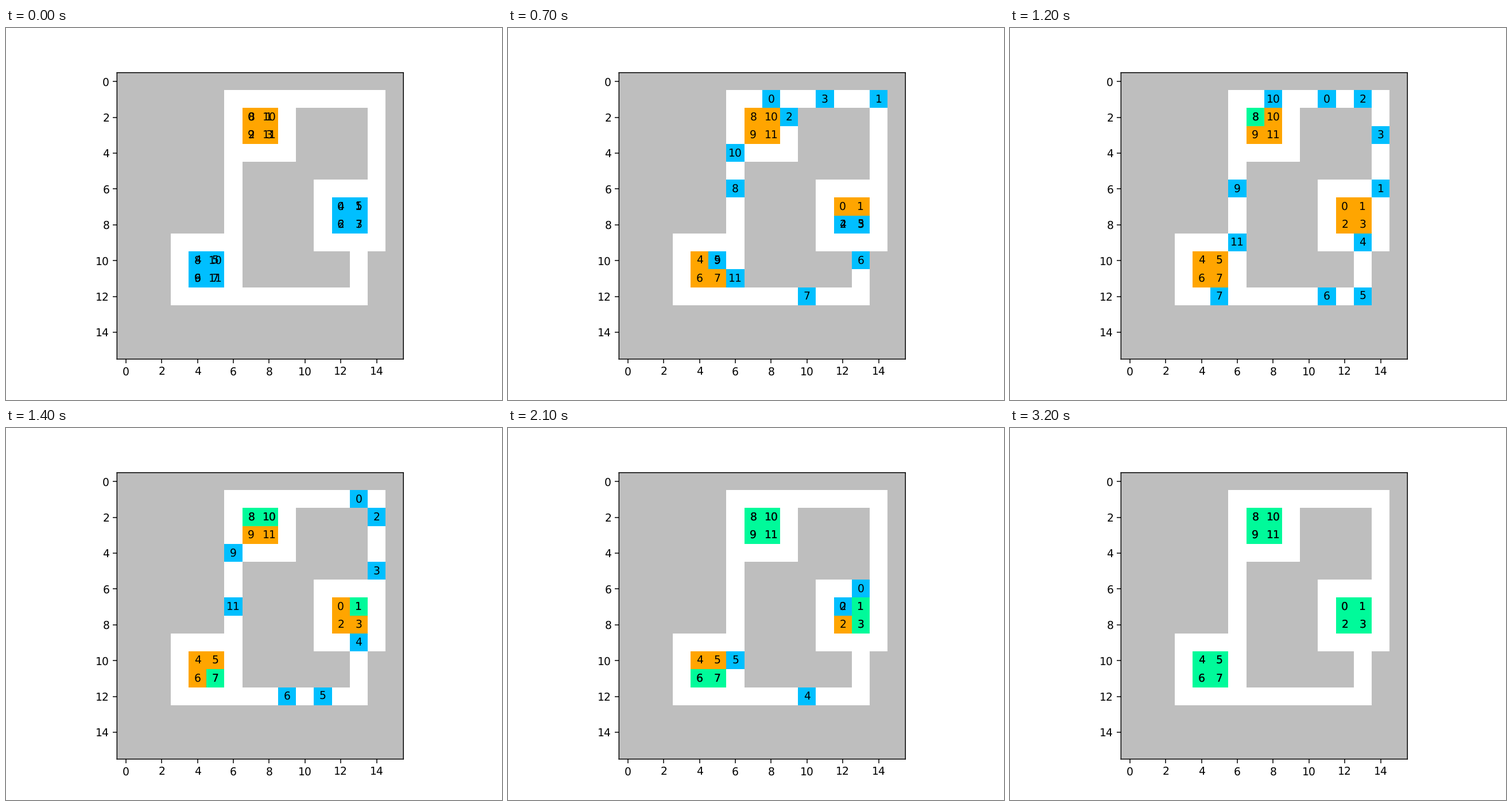
Animation of 864x648 px, one loop 8 s. Source, as a matplotlib script:

```python
import numpy as np
import matplotlib.pyplot as plt
from matplotlib.animation import FuncAnimation
from matplotlib.colors import to_rgb

plt.rcParams["text.hinting"] = "none"

FRAMES, STEP_MS = 80, 100
SIZE = 16
WALL, FREE, GOAL, AGENT, DONE = (
    to_rgb(c) for c in ("#bebebe", "white", "orange", "deepskyblue", "mediumspringgreen")
)

# Open areas as inclusive (left, top, right, bottom) cells.
AREAS = [
    (6, 1, 9, 4), (11, 6, 14, 9), (3, 9, 6, 12),
    (6, 1, 14, 1), (14, 1, 14, 9), (13, 9, 13, 12),
    (3, 12, 13, 12), (6, 1, 6, 12),
]
MOVES = {"U": (0, -1), "D": (0, 1), "L": (-1, 0), "R": (1, 0), "W": (0, 0)}

# Start cell and route of each agent: direction (W waits) and number of steps.
AGENTS = [
    ((7, 2), "W1 U1 R1 W6 R6 D5 L2 D1"),
    ((8, 2), "U1 R6 D6 L1"),
    ((7, 3), "W1 R1 U1 W3 R1 U1 R5 D5 L2 D2"),
    ((8, 3), "R1 U1 W1 U1 R2 W1 R3 D7 L1"),
    ((12, 7), "W3 D1 W4 R1 D1 W5 D3 L10 U1 W1 U1 R1"),
    ((13, 7), "W2 D1 W4 D3 W1 D1 L7 U2 L1"),
    ((12, 8), "W1 D1 R1 W3 D3 W1 L9 U1"),
    ((13, 8), "D4 L8 U1"),
    ((4, 10), "W1 R1 U1 R1 U7 R1"),
    ((4, 11), "L1 W1 R2 W2 U1 R1 U7 R1"),
    ((5, 10), "R1 U9 R2 D1"),
    ((5, 11), "W1 R1 W1 U1 W1 D1 W4 U7 R2 U1"),
]


def trace(start, route):
    cells = [start]
    for leg in route.split():
        dx, dy = MOVES[leg[0]]
        for _ in range(int(leg[1:])):
            x, y = cells[-1]
            cells.append((x + dx, y + dy))
    return cells


def make_floor():
    grid = np.empty((SIZE, SIZE, 3))
    grid[:] = WALL
    for left, top, right, bottom in AREAS:
        grid[top:bottom + 1, left:right + 1] = FREE
    return grid


def label(cell, number):
    return ax.text(*cell, str(number), ha="center", va="center")


paths = [trace(*agent) for agent in AGENTS]
floor = make_floor()

fig, ax = plt.subplots(figsize=(6.4, 4.8), dpi=135)
low, high = -0.5, SIZE - 0.5
# The cells reach a fraction of a pixel past the frame.
x_edges = np.linspace(low - 0.009, high + 0.009, SIZE + 1)
y_edges = np.linspace(low - 0.026, high - 0.009, SIZE + 1)
mesh = ax.pcolormesh(x_edges, y_edges, floor)
ax.set(xlim=(low, high), ylim=(high, low), aspect="equal", facecolor=WALL)
for spine in ax.spines.values():
    spine.set_snap(False)

for number, path in enumerate(paths):
    label(path[-1], number)
tags = [label(path[0], number) for number, path in enumerate(paths)]


def update(step):
    grid = floor.copy()
    for path, tag in zip(paths, tags):
        goal = path[-1]
        cell = path[min(step, len(path) - 1)]
        grid[goal[1], goal[0]] = GOAL
        grid[cell[1], cell[0]] = DONE if cell == goal else AGENT
        tag.set_position(cell)
    mesh.set_array(grid)
    return [mesh, *tags]


anim = FuncAnimation(fig, update, frames=FRAMES, interval=STEP_MS,
                     init_func=lambda: update(0), repeat=True, repeat_delay=0)
plt.show()
```
